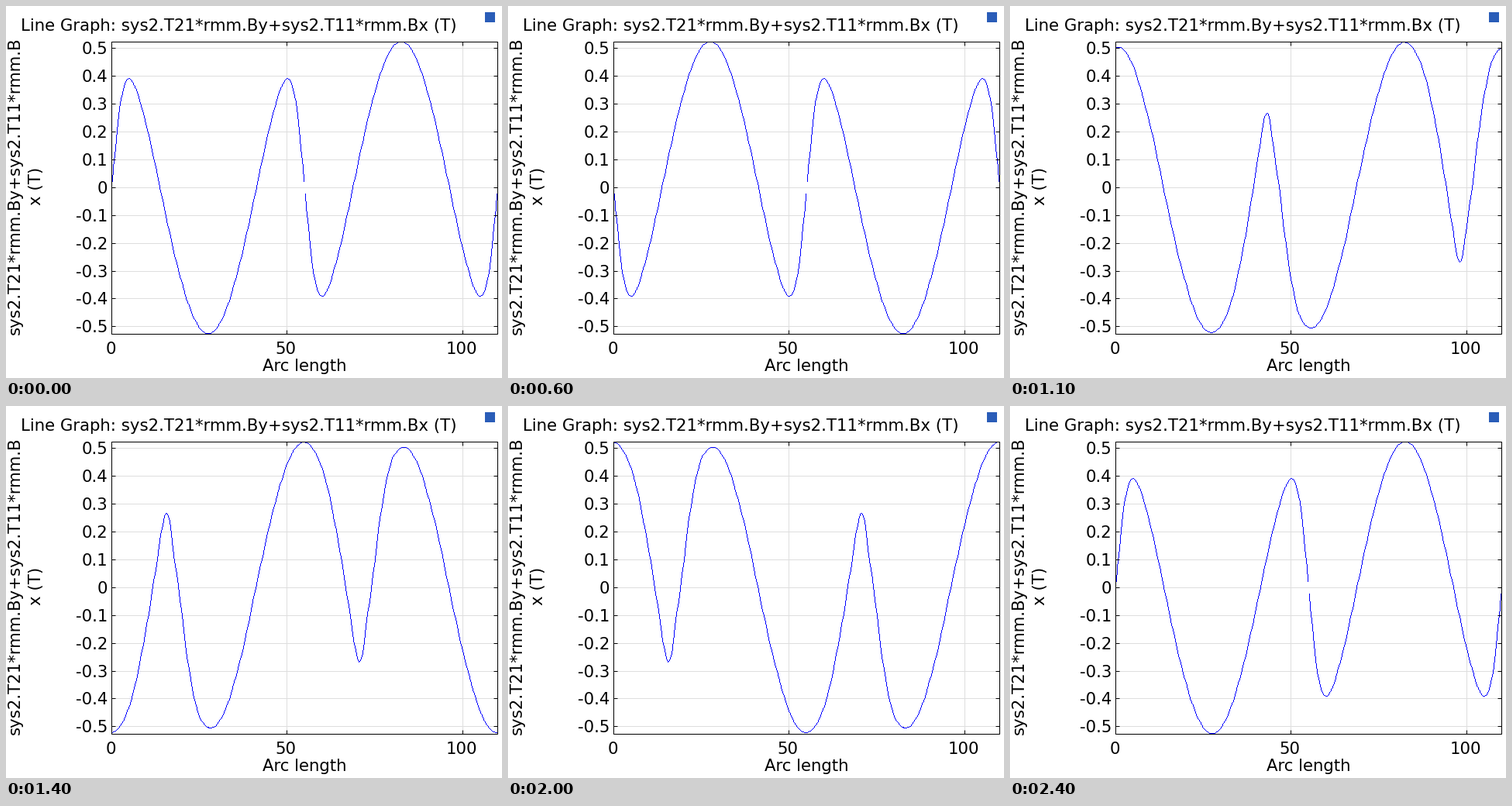
Write a matplotlib script that moves like this. It is 640 by 480 pixels and loops after 2.5 s.

```python
import numpy as np
import matplotlib.pyplot as plt
from matplotlib.animation import FuncAnimation
from matplotlib.patches import Rectangle

W, H, DPI = 640, 480, 100
PX = 72 / DPI
LENGTH, HALF, QUARTER = 110, 55, 27.5
LEFT, RIGHT, TOP, BOTTOM = 136.5, 634.5, 46.5, 423.5
INNER = slice(47, 423), slice(137, 634)
BLUE = (0, 0, 255, 255)

plt.rcParams["font.family"] = "DejaVu Sans"
plt.rcParams["font.size"] = 21.25 * PX

# Field along half the circle while the rotor gap is off axis: (arc, tesla)
KNOTS = np.array([
    (3, -.485), (6, -.385), (9, -.205), (11.7, 0), (13.2, .12), (14.4, .22),
    (15.2, .262), (15.8, .268), (16.4, .245), (17.6, .13), (19.1, -.005),
    (21, -.205), (23, -.365), (24.6, -.45), (26.5, -.493), (28.3, -.505),
    (32, -.45), (37, -.24), (42, .055), (47, .325), (51, .473), (54.8, .522),
])
KX = np.concatenate([KNOTS[:, 0] + HALF * k for k in (-1, 0, 1)])
KY = np.concatenate([KNOTS[:, 1] * sign for sign in (-1, 1, -1)])
KM = np.gradient(KY, KX)


def px(s):
    return LEFT + s * (RIGHT - LEFT) / LENGTH


def py(b):
    return 234.3 - 359 * b


def fold(s):
    """Position inside a half turn and the sign of that half."""
    turn, v = np.divmod(s, HALF)
    return v, np.where(turn % 2 == 0, 1, -1)


def aligned(s, reach):
    v, sign = fold(s)
    u = np.minimum(v, HALF - v)
    gap = u < .01
    u = np.maximum(u, reach)
    b = sign * .525 * np.cos(2 * np.pi * u / HALF) * np.tanh(u / 3.57)
    return np.where(gap, np.nan, b)


def skewed(s):
    v, sign = fold(s)
    i = np.searchsorted(KX, v, side="right") - 1
    h = KX[i + 1] - KX[i]
    t = (v - KX[i]) / h
    b = ((1 + 2 * t) * (1 - t) ** 2 * KY[i] + t * (1 - t) ** 2 * h * KM[i]
         + t * t * (3 - 2 * t) * KY[i + 1] + t * t * (t - 1) * h * KM[i + 1])
    return sign * b


def field(n, s):
    """The pattern turns back a quarter every three steps."""
    k, phase = divmod(n, 3)
    s = s + QUARTER * k
    if phase == 0:
        return aligned(s, .47 if k % 2 else 0)
    return skewed(QUARTER - s) if phase == 1 else skewed(s)


def stroke(x, y):
    """One-pixel hard-edged polyline, clipped to the plot; NaN breaks it."""
    img = np.zeros((H, W, 4), np.uint8)
    pts = np.floor(np.column_stack([x, y]))
    for a, b in zip(pts, pts[1:]):
        if np.isfinite([a, b]).all():
            steps = int(np.abs(b - a).max()) + 1
            cols, rows = np.rint(np.linspace(a, b, steps)).astype(int).T
            img[rows, cols] = BLUE
    out = np.zeros_like(img)
    out[INNER] = img[INNER]
    return out


fig = plt.figure(figsize=(W / DPI, H / DPI), dpi=DPI, facecolor="white")
ax = fig.add_axes([0, 0, 1, 1])
curve = ax.imshow(np.zeros((H, W, 4), np.uint8), extent=(0, W, H, 0),
                  aspect="auto", interpolation="nearest", zorder=2)
ax.set(xlim=(0, W), ylim=(H, 0))
ax.axis("off")


def rule(x, y, color="black", z=3):
    ax.plot(x, y, color=color, lw=PX, snap=False, zorder=z,
            solid_capstyle="butt")


def label(x, y, text, **kw):
    ax.text(x, y, text, va="baseline", rotation_mode="anchor", **kw)


GRID, TICK = "#dedede", 5
for i in range(-5, 6):
    y = np.floor(py(i / 10)) + .5
    rule([LEFT, RIGHT], [y, y], GRID, 1)
    rule([LEFT, LEFT + TICK], [y, y])
    rule([RIGHT - TICK, RIGHT], [y, y])
    label(131.5, y + 7.5, f"{i / 10:g}", ha="right")
for s in (0, 50, 100):
    x = np.floor(px(s)) + .5
    if s:
        rule([x, x], [TOP, BOTTOM], GRID, 1)
    rule([x, x], [TOP, TOP + TICK])
    rule([x, x], [BOTTOM - TICK, BOTTOM])
    label(x - 1.3, 449, str(s), ha="center")
ax.add_patch(Rectangle((LEFT, TOP), RIGHT - LEFT, BOTTOM - TOP, fill=False,
                       lw=PX, ec="black", snap=False, zorder=4))

label(19, 32, "Line Graph: sys2.T21*rmm.By+sys2.T11*rmm.Bx (T)")
label(331, 471, "Arc length")
label(18, 424, "sys2.T21*rmm.By+sys2.T11*rmm.B", rotation=90)
label(45, 257, "x (T)", rotation=90)
ax.add_patch(Rectangle((618, 8), 13, 13, color="#2a5db8", lw=0))

gaps = np.arange(0, LENGTH + 1, QUARTER)
arc = np.sort(np.concatenate([np.arange(0, LENGTH + .1, .5),
                              gaps - .15, gaps + .15]))


def update(n):
    curve.set_data(stroke(px(arc), py(field(n, arc))))
    return curve,


anim = FuncAnimation(fig, update, frames=25, interval=100, repeat=True,
                     repeat_delay=0)
plt.show()
```
